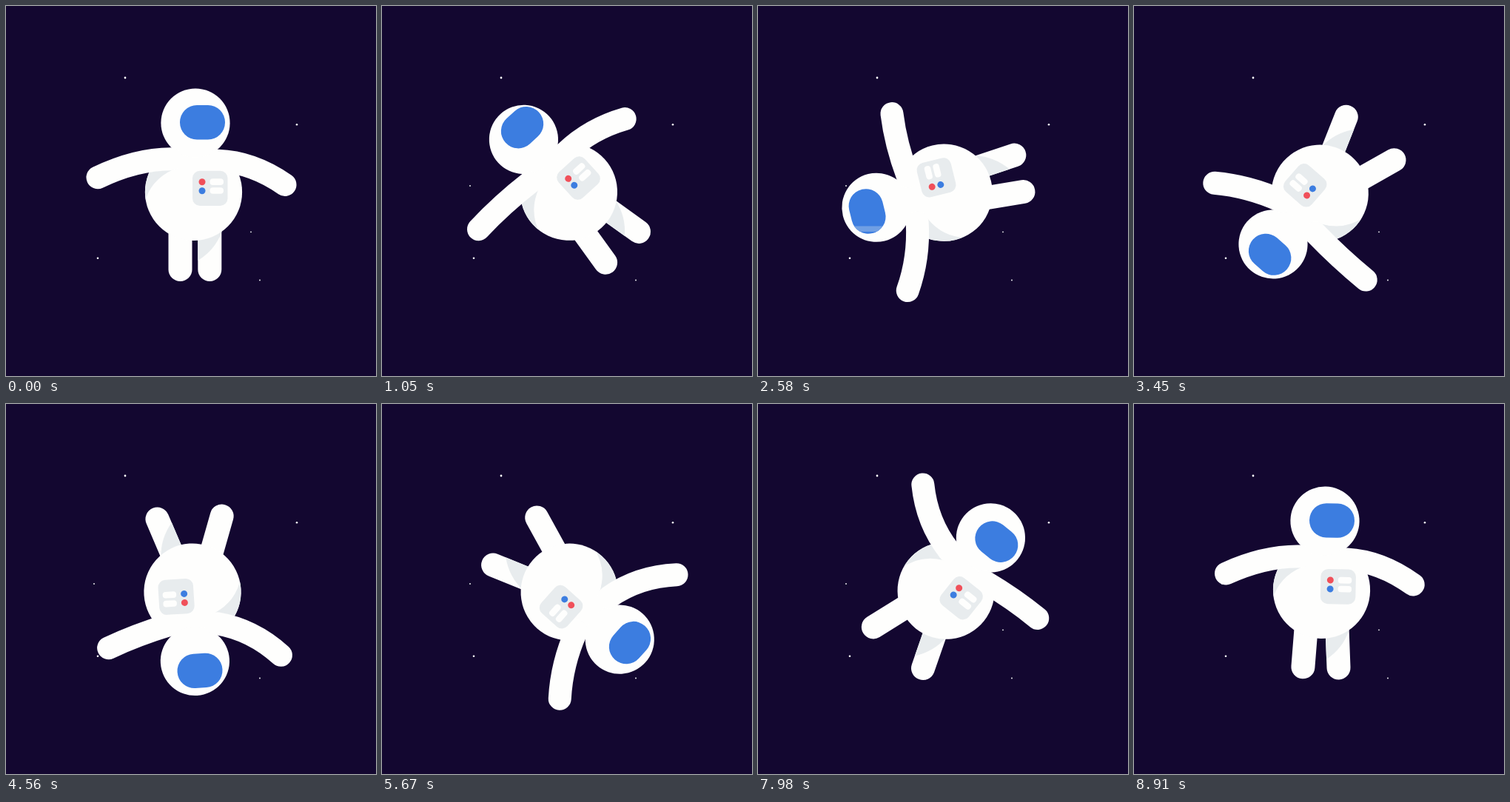
Recreate the animation shown at these times as an HTML page. Size 500 by 500 pixels, loop 8940 ms.

```html
<!DOCTYPE html>
<html lang="en">
<head>
<meta charset="utf-8">
<title>Floating astronaut</title>
<style>
  html, body { margin: 0; width: 100%; height: 100%; overflow: hidden; background: #130730; }
  svg { display: block; width: 100vw; height: 100vh; }
  .suit { fill: #fefefd; }
  .shade { fill: #e8ecee; }
  .limb { fill: none; stroke: #fefefd; stroke-linecap: round; }
  .blue { fill: #3c7de0; }
  .red { fill: #f0505a; }
</style>
</head>
<body>
<svg viewBox="0 0 500 500">
  <defs>
    <clipPath id="bodyClip"><circle cx="253.5" cy="251.4" r="65.6"/></clipPath>
    <clipPath id="visorClip"><rect x="-30.5" y="-23.2" width="61" height="46.4" rx="23"/></clipPath>
  </defs>
  <rect width="500" height="500" fill="#130730"/>
  <g fill="#fff">
    <circle cx="161" cy="97" r="1.4"/>
    <circle cx="393" cy="160.3" r="1.3"/>
    <circle cx="124" cy="340.7" r="1.3"/>
    <circle cx="119" cy="243" r=".9"/>
    <circle cx="331" cy="305.3" r=".9"/>
    <circle cx="343" cy="370.5" r=".9"/>
  </g>
  <g id="astronaut">
    <path id="legLeft" class="limb" stroke-width="32" d="M235.5 272V356"/>
    <g id="legRight">
      <path class="limb" stroke-width="32" d="M275.3 280V356"/>
      <path class="shade" d="M259.3 290H291.3V306Q282 330 259.3 344Z"/>
    </g>
    <circle class="suit" cx="253.5" cy="251.4" r="65.6"/>
    <path class="shade" clip-path="url(#bodyClip)" d="M187 267Q195 235 226 221L200 190L180 190Z"/>
    <circle class="suit" cx="256" cy="158" r="46.6"/>
    <path id="armLeft" class="limb" stroke-width="31"/>
    <path id="armRight" class="limb" stroke-width="31"/>
    <g id="visor">
      <rect class="blue" x="-30.5" y="-23.2" width="61" height="46.4" rx="23"/>
      <g clip-path="url(#visorClip)">
        <rect id="glint" x="-40" y="20" width="80" height="7.5" fill="#709fe4"/>
      </g>
    </g>
    <rect class="shade" x="252" y="222.8" width="47.5" height="47.2" rx="10"/>
    <circle class="red" cx="265" cy="237.7" r="4.5"/>
    <circle class="blue" cx="265" cy="249.7" r="4.5"/>
    <rect class="suit" x="275.5" y="233.3" width="18.5" height="8.6" rx="4"/>
    <rect class="suit" x="275.5" y="245.2" width="18.5" height="8.6" rx="4"/>
  </g>
</svg>
<script>
const LOOP = 8940, STEP = 30, CENTER = 252.7;
const el = id => document.getElementById(id);
const move = (id, value) => el(id).setAttribute('transform', value);
const mix = (a, b, p) => a + (b - a) * p;

function ease(t, from, to) {
  const p = Math.min(1, Math.max(0, (t - from) / (to - from)));
  return p * p * (3 - 2 * p);
}

// Rises from 0 to 1, holds, then falls back to 0.
const pulse = (t, rise, top, fall, end) => ease(t, rise, top) - ease(t, fall, end);

// Each lift runs from 0 (arm at rest) to 1 (arm raised).
const leftLift = t => pulse(t, 0, 800, 8100, 8900)
  - 0.69 * pulse(t, 850, 1080, 1100, 3000)
  - 0.62 * pulse(t, 2300, 3420, 3450, 3750)
  - 0.15 * pulse(t, 5700, 7000, 7100, 8100);

const rightLift = t => 0.96 * pulse(t, 950, 1340, 1360, 2000)
  + 0.96 * pulse(t, 2000, 3250, 3500, 4000)
  + 0.5 * pulse(t, 3600, 5000, 6330, 7050)
  + 0.5 * pulse(t, 3600, 5000, 8000, 8910);

// Points are relative to the centre of rotation.
function drawArm(id, shoulder, elbow, hand) {
  const [s, e, h] = [shoulder, elbow, hand].map(p => p.map(v => (v + CENTER).toFixed(2)).join(' '));
  el(id).setAttribute('d', `M${s}Q${e} ${h}`);
}

function render(t) {
  const turn = 360 * t / LOOP;
  move('astronaut', `rotate(${-turn} ${CENTER} ${CENTER})`);

  const firstKick = pulse(t, 0, 900, 1500, 2500);
  const bigKicks = 19.5 * (pulse(t, 2300, 3200, 6100, 7300) + pulse(t, 7200, 7700, 8100, 9200));
  move('legLeft', `rotate(${6.5 * firstKick + bigKicks} 235.5 272)`);
  move('legRight', `rotate(${-12 * firstKick - bigKicks} 275.3 298)`);

  const left = leftLift(t), right = rightLift(t);
  drawArm('armLeft', [-30, -46], [-77, mix(-45.8, -57, left)], [mix(-128.7, -113, left), mix(-21, -94, left)]);
  drawArm('armRight', [34, -43.5], [80, mix(-42, -58, right)], [mix(124.3, 117, right), mix(-11.3, -87.5, right)]);

  const vx = 12.8 - 15.3 * pulse(t, 1050, 3300, 5700, 7100);
  const vy = -95.5 - 12.5 * pulse(t, 0, 1000, 5600, 7100);
  move('visor', `translate(${CENTER + vx} ${CENTER + vy})`);

  // The glint stays level and shows only while the astronaut lies sideways.
  move('glint', `rotate(${turn})`);
  const sideways = Math.abs(Math.sin(turn * Math.PI / 180)) > 0.93;
  el('glint').setAttribute('opacity', sideways ? 1 : 0);
}

const start = performance.now();
function frame() {
  const t = (performance.now() - start) % LOOP;
  render(Math.floor(t / STEP) * STEP);
  requestAnimationFrame(frame);
}
render(0);
requestAnimationFrame(frame);
</script>
</body>
</html>
```
